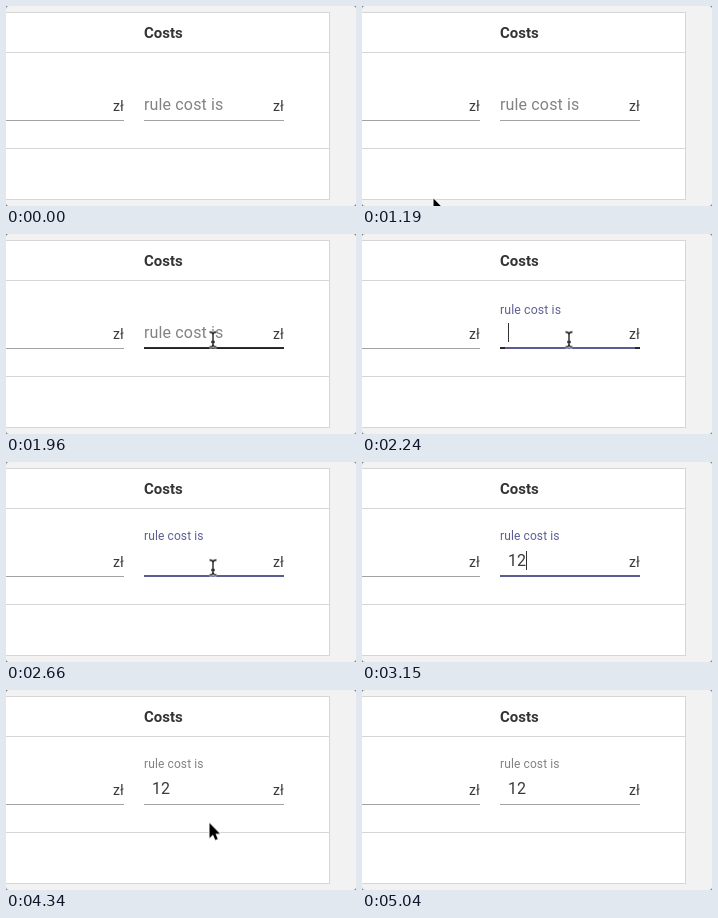
An HTML page that plays this animation: 350x200 px, repeating every 6720 ms.

```html
<!DOCTYPE html>
<html lang="en">
<head>
<meta charset="utf-8">
<title>Rule cost field</title>
<style>
  html, body { margin: 0; width: 100%; height: 100%; overflow: hidden; background: #777; }
  svg { display: block; width: 350px; height: 200px; font-family: Roboto, sans-serif; }

  :root { --ink: #3a3a3a; --hint: #828282; --accent: #5b5d92; }
  .anim { animation: 6720ms linear infinite; }
  .cut { animation-timing-function: step-end; }

  .head { font-weight: 700; font-size: 15px; fill: #333; }
  .unit { font-size: 14px; letter-spacing: .15px; fill: var(--ink); }
  .value { font-size: 16px; fill: var(--ink); }
  .label { font-size: 16px; letter-spacing: .15px; fill: var(--hint); animation-name: label; }
  .hover { animation-name: hover; }
  .accent { fill: var(--accent); transform-box: fill-box; transform-origin: center; animation-name: accent; }
  .caret { animation-name: caret; }
  .one { animation-name: one; }
  .two { animation-name: two; }
  .pointer { animation-name: travel; }
  .arrow { animation-name: arrow; }
  .beam { animation-name: beam; }

  /* The label floats up on focus and stays there, since the field is filled. */
  @keyframes label {
    0%, 31.44% { transform: translate(138px, 104px) scale(1); fill: var(--hint);
                 animation-timing-function: cubic-bezier(0, 0, .2, 1); }
    34.42%, 60.2% { transform: translate(138px, 78.4px) scale(.75); fill: var(--accent); }
    63.4%, 100% { transform: translate(138px, 78.4px) scale(.75); fill: var(--hint); }
  }
  @keyframes accent {
    0%, 31.44% { transform: scaleX(0); animation-timing-function: cubic-bezier(0, 0, .2, 1); }
    34.42%, 60.2% { transform: scaleX(1); animation-timing-function: cubic-bezier(0, 0, .2, 1); }
    63.4%, 100% { transform: scaleX(0); }
  }
  @keyframes hover {
    0%, 26.6% { opacity: 0; }
    29.1%, 54% { opacity: .87; }
    57%, 100% { opacity: 0; }
  }
  @keyframes caret {
    0% { opacity: 0; transform: none; }
    31.2% { opacity: 1; }
    39.55% { opacity: 0; transform: none; }
    44.75% { opacity: 1; transform: translateX(9px); }
    46.82% { opacity: 1; transform: translateX(18px); }
    54.1%, 100% { opacity: 0; transform: translateX(18px); }
  }
  @keyframes one { 0% { opacity: 0; } 44.75%, 100% { opacity: 1; } }
  @keyframes two { 0% { opacity: 0; } 46.82%, 100% { opacity: 1; } }

  @keyframes travel {
    0%, 17.75% { transform: translate(71px, 192px); }
    19.79% { transform: translate(124px, 156px); }
    21.88% { transform: translate(168px, 131px); }
    23.96% { transform: translate(196px, 117px); }
    25% { transform: translate(203px, 112px); }
    27.08% { transform: translate(206.5px, 106px); }
    29.17%, 53.2% { transform: translate(207px, 105.5px); }
    54.17% { transform: translate(206px, 109px); }
    55.21% { transform: translate(204px, 120px); }
    58.33%, 59.4% { transform: translate(203px, 132.5px); }
    61.46% { transform: translate(203px, 137px); }
    64.5%, 68.75% { transform: translate(203px, 132.5px); }
    69.79% { transform: translate(206px, 133px); }
    71.88% { transform: translate(258px, 136px); }
    73.96%, 100% { transform: translate(333px, 138.5px); }
  }
  @keyframes arrow {
    0% { opacity: 0; }
    17.66% { opacity: 1; }
    24.6% { opacity: 0; }
    55.1% { opacity: 1; }
    74.95%, 100% { opacity: 0; }
  }
  @keyframes beam {
    0% { opacity: 0; }
    24.6% { opacity: 1; }
    44.75% { opacity: 0; }
    53.1% { opacity: 1; }
    55.1%, 100% { opacity: 0; }
  }
</style>
</head>
<body>
<svg viewBox="0 0 350 200">
  <defs>
    <path id="beam" d="M-3.5-7.5Q0-7.5 0-5Q0-7.5 3.5-7.5M0-5V5M-3.5 7.5Q0 7.5 0 5Q0 7.5 3.5 7.5M-2 2.5H2" fill="none"/>
  </defs>

  <rect width="350" height="200" rx="3" fill="#f2f2f2"/>
  <rect x="-5.5" y="6.5" width="329" height="187" fill="#fff" stroke="#d6d6d6"/>
  <path d="M0 46.5H323M0 142.5H323" stroke="#d6d6d6"/>
  <text class="head" x="138" y="32">Costs</text>

  <path d="M0 114.5H118M138 114.5H278" stroke="#a3a3a3"/>
  <text class="unit" x="107" y="105">zł</text>
  <text class="unit" x="267" y="105">zł</text>

  <rect class="anim hover" x="138" y="113" width="140" height="2" fill="#111"/>
  <rect class="anim accent" x="138" y="113" width="140" height="2"/>
  <text class="anim label">rule cost is</text>
  <text class="anim cut value one" x="146" y="104">1</text>
  <text class="anim cut value two" x="155" y="104">2</text>
  <rect class="anim cut caret" x="146" y="89" width="1" height="19" fill="#333"/>

  <g class="anim pointer">
    <path class="anim cut arrow" d="M.5 .5V15.5L4 12.3L6.3 17.6L8.8 16.5L6.5 11.3H11Z"
          stroke="#fff" stroke-width="1.6" paint-order="stroke"/>
    <g class="anim cut beam">
      <use href="#beam" stroke="#fff" stroke-width="3"/>
      <use href="#beam" stroke="#111" stroke-width="1.3"/>
    </g>
  </g>
</svg>
</body>
</html>
```
